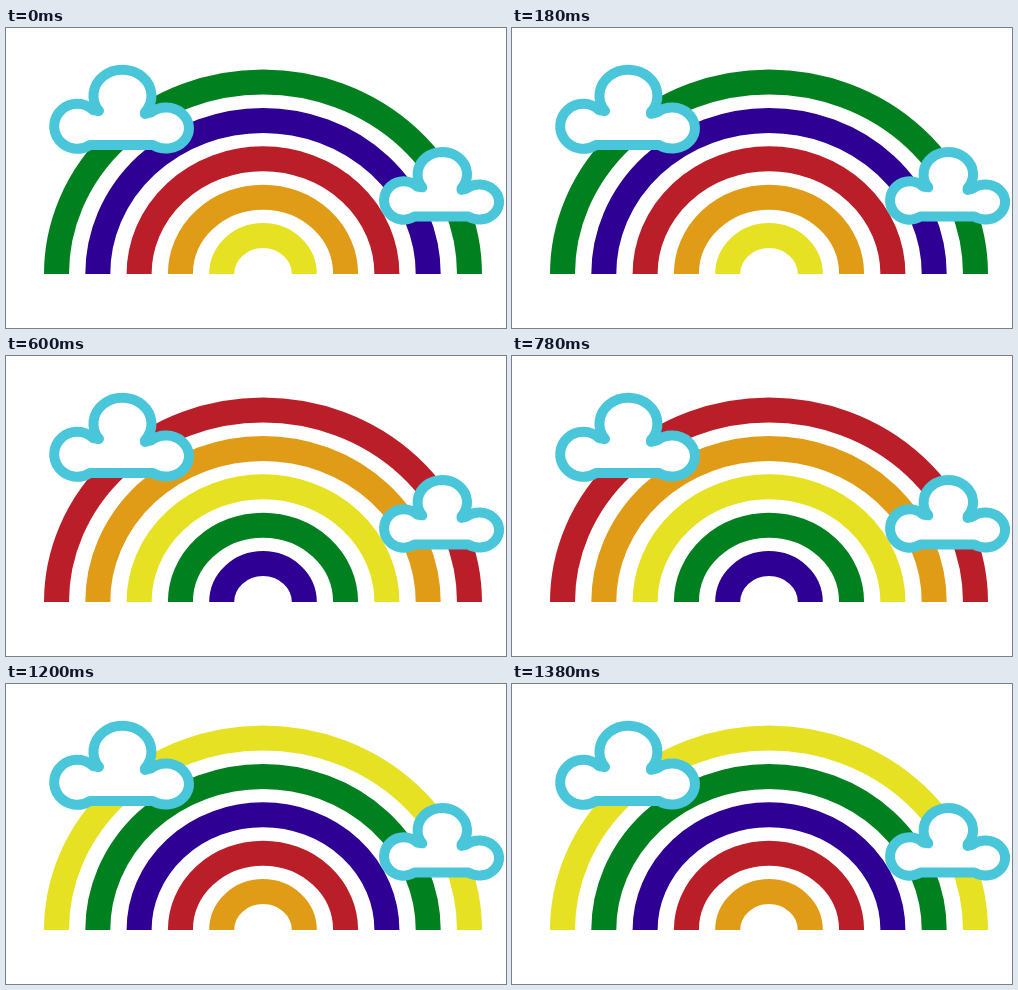
Animation, 500 px wide and 300 px high, one loop 1500 ms. Source, as an HTML page:

```html
<!DOCTYPE html>
<html lang="en">
<head>
<meta charset="utf-8">
<title>Rainbow</title>
<style>
  html, body { margin: 0; width: 100%; height: 100%; overflow: hidden; background: #fff; }
  svg { display: block; width: 500px; height: 300px; }
  .band { fill: none; stroke-width: 25; }
  .cloud {
    fill: #fff; stroke: #4ac6da; stroke-width: 10;
    stroke-linejoin: round; vector-effect: non-scaling-stroke;
  }
</style>
</head>
<body>
<svg viewBox="0 0 500 300">
  <defs>
    <path id="cloud" class="cloud" d="M84 117 A23 22.5 0 1 1 87 82 L93 83
      A29 26 0 1 1 139 84 L139 86 L145 84.5 A23 20.5 0 1 1 147 117 Z"/>
  </defs>
  <g id="bands"></g>
  <use href="#cloud"/>
  <use href="#cloud" transform="translate(337 88.4) scale(.853 .855)"/>
</svg>
<script>
  const COLORS = ['#00801f', '#2e0094', '#ba1e28', '#e09c16', '#e6e122'];
  const STEP = 300;
  const CENTER = { x: 257, y: 246 };
  const count = COLORS.length;
  const group = document.getElementById('bands');

  function addBand(index) {
    const size = count - index;
    const rx = 41.3 * size, ry = 38.4 * size;
    const path = document.createElementNS('http://www.w3.org/2000/svg', 'path');
    path.setAttribute('class', 'band');
    path.setAttribute('d', `M${CENTER.x - rx} ${CENTER.y} a${rx} ${ry} 0 0 1 ${2 * rx} 0`);
    group.append(path);
    return path;
  }

  const bands = COLORS.map((_, i) => addBand(i));

  // Each color moves one band outward per step.
  function draw(time) {
    const shift = Math.floor(time / STEP) % count;
    bands.forEach((band, i) => band.setAttribute('stroke', COLORS[(i + shift) % count]));
  }

  const start = performance.now();
  function tick() {
    draw(performance.now() - start);
    requestAnimationFrame(tick);
  }
  tick();
</script>
</body>
</html>
```
